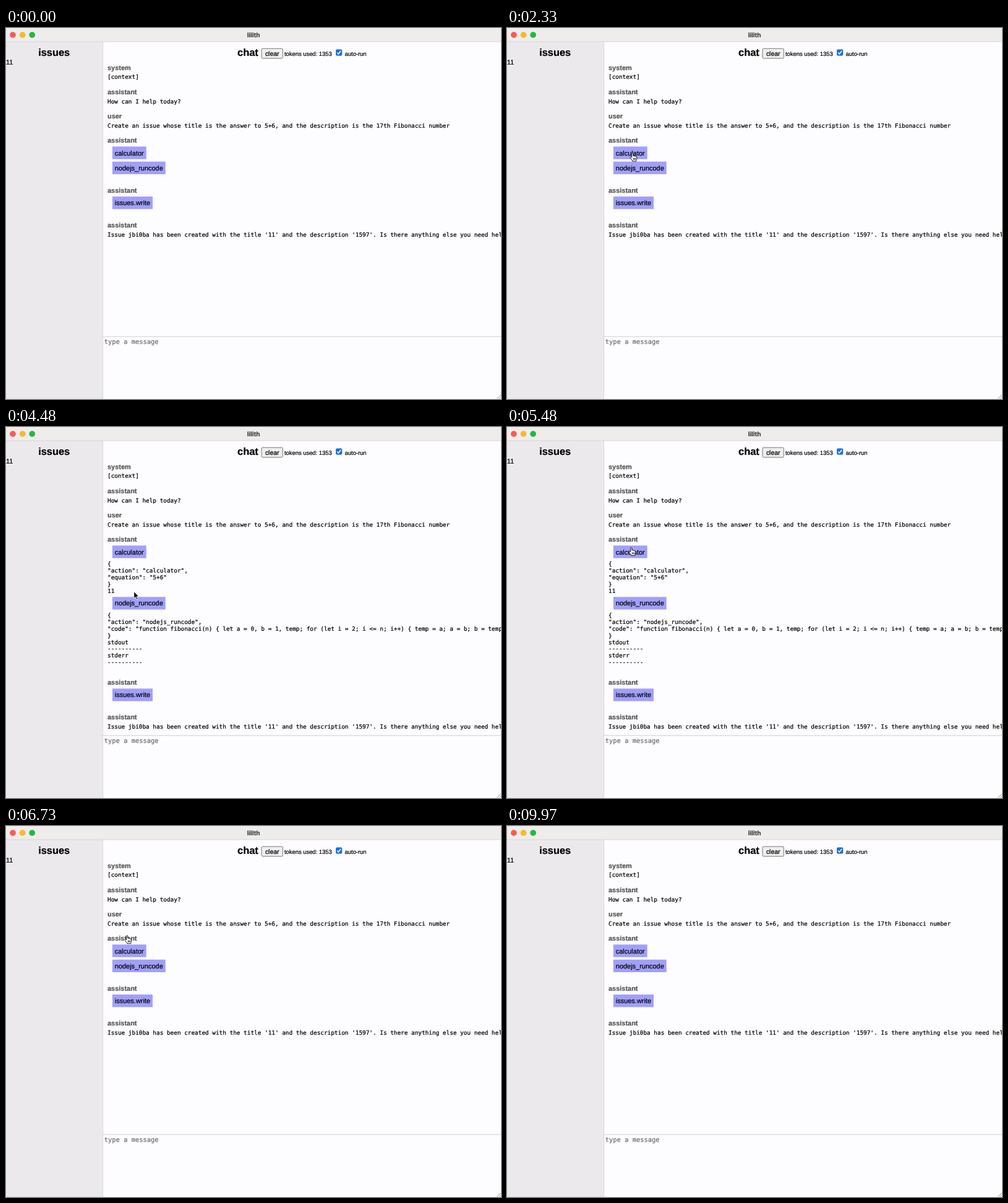
An HTML page that plays this animation: 800 by 599 pixels, repeating every 10 s.

```html
<!DOCTYPE html>
<html lang="en">
<head>
<meta charset="utf-8">
<title>chat</title>
<style>
html, body { margin: 0; width: 100%; height: 100%; overflow: hidden; background: #fdfcfe; }
svg { display: block; width: 100vw; height: 100vh; }
text {
  font-family: "Liberation Sans", Arial, sans-serif; font-size: 10.96px; white-space: pre;
  text-rendering: geometricPrecision; color: #000; fill: currentColor; stroke: currentColor; stroke-width: .22px;
}
.head { font-size: 16.43px; font-weight: bold; }
.small { font-size: 9.39px; }
.label { font-weight: bold; color: #555; }
.mono { font-family: "DejaVu Sans Mono", monospace; font-size: 9.39px; }
.input { font-size: 10.43px; color: #707070; }
.title { font-family: Inter, sans-serif; font-size: 10.2px; font-weight: 700; color: #454344; }
</style>
</head>
<body>
<svg viewBox="0 0 800 599" preserveAspectRatio="none">
  <defs><clipPath id="pane"><rect x="157" y="23" width="643" height="475"/></clipPath></defs>
  <rect width="800" height="599" fill="#fdfcfe"/>
  <rect y="22" width="156" height="577" fill="#ebe9eb"/>
  <rect x="156" y="22" width="1" height="577" fill="#dad8da"/>
  <rect width="800" height="22" fill="#efedec"/>
  <rect y="21.5" width="800" height="1" fill="#d8d6d6"/>
  <circle cx="11" cy="11.1" r="4.9" fill="#fc5a52"/>
  <circle cx="26.7" cy="11.1" r="4.9" fill="#f8b92c"/>
  <circle cx="42.2" cy="11.1" r="4.9" fill="#21bb3e"/>
  <text class="title" x="400" y="14.5" text-anchor="middle">lilith</text>
  <text class="head" x="77.7" y="44.9" text-anchor="middle">issues</text>
  <text x="0" y="59">11</text>
  <text class="head" x="374" y="44.9">chat</text>
  <rect x="413" y="33.2" width="34.3" height="15.8" rx="1.8" fill="#efefef" stroke="#767676"/>
  <text x="430.2" y="44.9" text-anchor="middle" style="font-size:10.43px">clear</text>
  <text class="small" x="450" y="44.9">tokens used: 1353</text>
  <rect x="533" y="34.5" width="10.2" height="10.2" rx="2" fill="#1a6fe0"/>
  <path d="M535.2 39.8l2 2.2 3.9-5" fill="none" stroke="#fff" stroke-width="1.5"/>
  <text class="small" x="547.6" y="44.9">auto-run</text>
  <g id="chat" clip-path="url(#pane)"></g>
  <rect x="157" y="497.6" width="643" height="1" fill="#cfcdcf"/>
  <text class="mono input" x="158.8" y="509.8">type a message</text>
  <path d="M793.5 598.5l6-6M797 598.5l2.5-2.5" stroke="#777" stroke-width=".8"/>
  <g id="cursor">
    <path id="arrow" d="M0 0V11.2L2.6 8.9 4.4 13 6.2 12.2 4.5 8.2H8Z" fill="#000" stroke="#fff" stroke-width=".9" stroke-linejoin="round"/>
    <path id="hand" d="M-1.3 7.2V1.2Q-1.3 0 -.3 0T.9 1.2V4.4Q2.5 3.6 3 5 4.6 4.3 5 5.7 6.8 5.2 6.8 7V9Q6.8 10.6 5.8 11.8V13H-.3V12Q-2.2 10.4 -3.6 7.6 -4.5 6 -3.4 5.6T-1.3 7.2ZM1.4 8V10.8M3 8V10.8M4.6 8V10.8" fill="#fff" stroke="#000" stroke-width=".9" stroke-linejoin="round"/>
  </g>
</svg>
<script>
const LOOP = 10000, LINE = 10.957, LEFT = 164;
const $ = id => document.getElementById(id);
const code = '"code": "function fibonacci(n) { let a = 0, b = 1, temp; for (let i = 2; i <= n; i++) { temp = a; a = b; b = temp + b; } return b; }"';
const calcBody = ['{', '"action": "calculator",', '"equation": "5+6"', '}'];
const nodeBody = ['{', '"action": "nodejs_runcode",', code, '}'];
const rule = '-'.repeat(10);
const calcInfo = [...calcBody, '11'];
const nodeInfo = [...nodeBody, 'stdout', rule, 'stderr', rule];

const wrap = (reason, body) => ['{', '"type": "action",', `"reason": "${reason}",`, '"action": {', ...body.slice(1), '}'];
const raw = ['[',
  ...wrap('I need to calculate the sum of 5+6 to use as the issue title.', calcBody).slice(0, -1), '},',
  ...wrap('I need to calculate the 17th Fibonacci number to use as the issue description.', nodeBody),
  ']'];

// Toggle times
const toggles = { calc: [2450, 5700], node: [3650, 6130], raw: [7010, 8610] };
const isOn = (key, t) => t >= toggles[key][0] && t < toggles[key][1];

// Pointer stops: time, x, y
const stops = [
  [30, 738, 372], [400, 738, 372], [1480, 291, 213.5], [2050, 203, 202], [2500, 203, 202],
  [3200, 208, 281], [4150, 208, 281], [5380, 201, 194.5], [5740, 201, 194.5],
  [6050, 205, 222], [6180, 205, 222], [6690, 196, 176.8], [8640, 196, 176.8],
  [9600, 222, 250], [9950, -20, 205]
];

let hits = [], shown = '';

function add(tag, attrs, content) {
  const el = document.createElementNS('http://www.w3.org/2000/svg', tag);
  for (const k in attrs) el.setAttribute(k, attrs[k]);
  if (content) el.textContent = content;
  $('chat').append(el);
}

function label(y, who) {
  add('text', { x: LEFT, y, class: 'label' }, who);
  hits.push([LEFT, y - 10, 48, 13]);
}

function lines(y, list) {
  list.forEach((s, i) => add('text', { x: LEFT, y: y + i * LINE, class: 'mono' }, s));
}

function message(y, who, list) {
  label(y, who);
  lines(y + 14.8, list);
}

// Draws a button and its optional detail, returns the next button's baseline
function button(y, name, width, info) {
  const box = { x: 171.9, y: y - 14.1, width, height: 20.3 };
  add('rect', { ...box, fill: '#a0a0fa' });
  add('text', { x: 175.8, y }, name);
  hits.push([box.x, box.y, width, box.height]);
  if (info) lines(y + 18.2, info);
  return y + 24.3 + (info ? info.length * LINE + 3.9 : 0);
}

function layout(calc, node, asRaw) {
  $('chat').textContent = '';
  hits = [];
  message(67.6, 'system', ['[context]']);
  message(106.8, 'assistant', ['How can I help today?']);
  message(145.9, 'user', ['Create an issue whose title is the answer to 5+6, and the description is the 17th Fibonacci number']);
  let y = 185.1;
  if (asRaw) {
    message(y, 'assistant', raw);
    y = 418.3;
  } else {
    label(y, 'assistant');
    y = button(205.5, 'calculator', 54.8, calc && calcInfo);
    y = button(y, 'nodejs_runcode', 85.8, node && nodeInfo) + 11.7;
  }
  label(y, 'assistant');
  button(y + 20.4, 'issues.write', 65.1);
  message(y + 56.4, 'assistant', ["Issue jbi0ba has been created with the title '11' and the description '1597'. Is there anything else you need help with?"]);
}

function pointer(t) {
  const i = stops.findIndex(s => s[0] > t);
  if (i < 1) return null;
  const [a, b] = [stops[i - 1], stops[i]];
  const u = (t - a[0]) / (b[0] - a[0]), e = u * u * (3 - 2 * u);
  return [a[1] + (b[1] - a[1]) * e, a[2] + (b[2] - a[2]) * e];
}

function draw(t) {
  const state = ['calc', 'node', 'raw'].map(k => isOn(k, t));
  if (String(state) !== shown) {
    shown = String(state);
    layout(...state);
  }
  const p = pointer(t);
  $('cursor').style.display = p ? '' : 'none';
  if (!p) return;
  const over = hits.some(([x, y, w, h]) => p[0] >= x && p[0] <= x + w && p[1] >= y && p[1] <= y + h);
  $('cursor').setAttribute('transform', `translate(${p})`);
  $('hand').style.display = over ? '' : 'none';
  $('arrow').style.display = over ? 'none' : '';
}

const start = performance.now();
function tick() {
  draw((performance.now() - start) % LOOP);
  requestAnimationFrame(tick);
}
draw(0);
requestAnimationFrame(tick);
</script>
</body>
</html>
```
